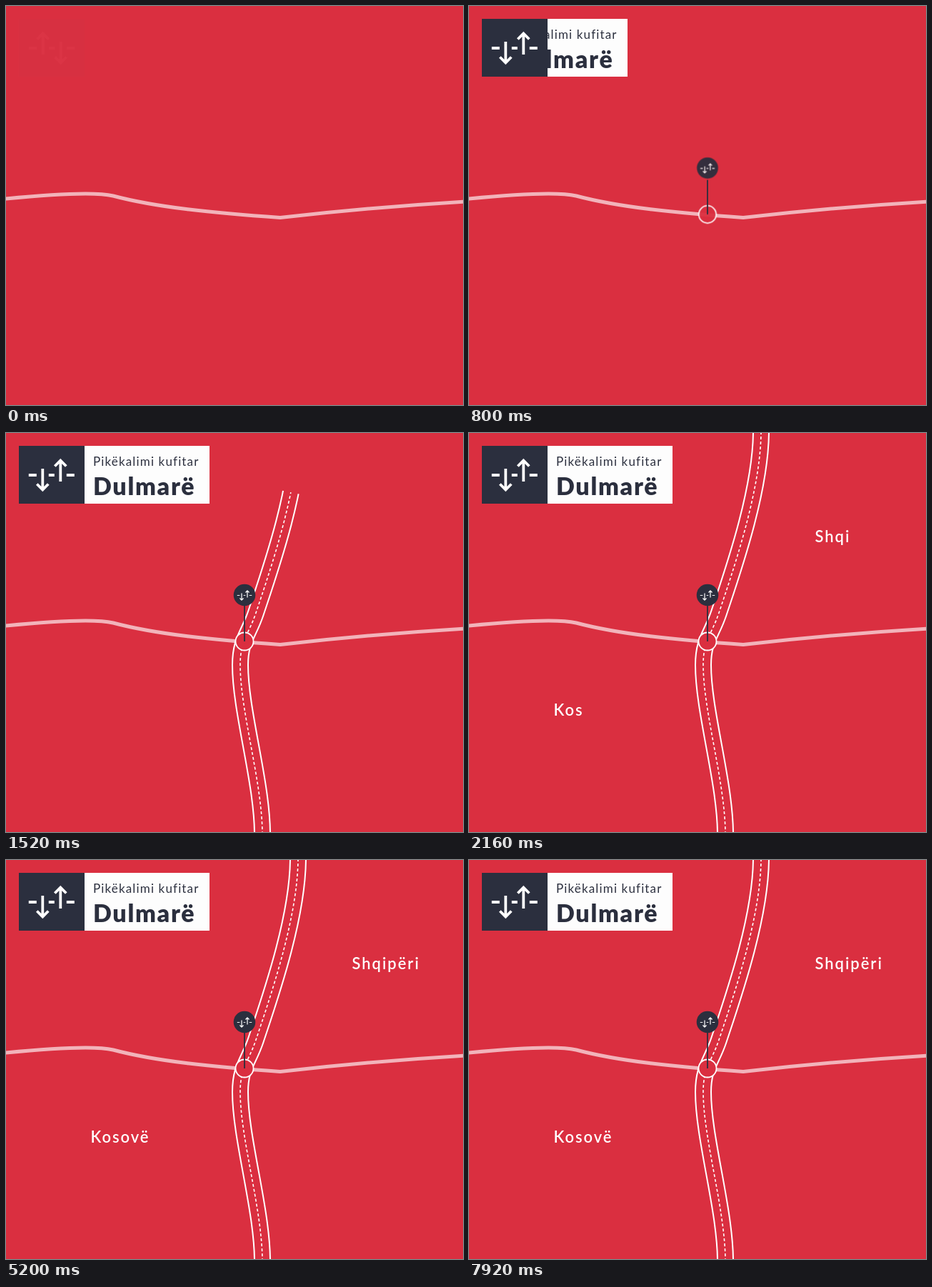
Animation, 640 px wide and 559 px high, one loop 8 s. Source, as an HTML page:

```html
<!DOCTYPE html>
<html lang="sq">
<head>
<meta charset="utf-8">
<title>Border crossing</title>
<style>
  html, body { margin: 0; height: 100%; overflow: hidden; background: #da2f40; }
  .stage { position: relative; width: 640px; height: 559px; overflow: hidden; }
  svg { position: absolute; left: 0; top: 0; overflow: visible; }
  text { font-family: Lato, "Open Sans", sans-serif; }
  .label { font-size: 22px; font-weight: 600; letter-spacing: 1.95px; fill: #fff; }
  .icon { fill: none; stroke: #fff; stroke-width: 3.8; }
  .card, .slot { position: absolute; top: 18px; height: 81px; }
  .card { left: 18px; width: 92px; background: #2b2f3e; }
  .slot { left: 109px; width: 176px; overflow: hidden; }
  .panel { position: absolute; width: 176px; height: 81px; background: #fdfdfd; }
  .panel text { fill: #2b2f3e; }
  .kind { font-size: 17px; letter-spacing: 1.15px; }
  .name { font-size: 34px; font-weight: 900; letter-spacing: 1.7px; }
  #head, #ring { transform-box: fill-box; transform-origin: center; }
  #pole { transform-origin: 334px 292px; }
</style>
</head>
<body>
<div class="stage">
  <svg width="640" height="559">
    <defs>
      <path id="route" d="M359 562 C359 490 328 390 328 325 C328 290 340 282 350 252 C370 192 409 80 409 -3"/>
      <path id="arrows" d="M-32 0h11M-4 0h8M21 0h11M-12.5 -9v29M-20.5 12.5l8 8l8 -8M12.5 9v-29M4.5 -12.5l8 -8l8 8"/>
      <mask id="reveal" maskUnits="userSpaceOnUse" x="0" y="-10" width="640" height="580">
        <use id="wipe" href="#route" fill="none" stroke="#fff" stroke-width="34"/>
      </mask>
    </defs>
    <path d="M-3 270.3 C60 264 125 260 150 266 C210 282 290 290 384 296.5 Q510 282 643 274"
          fill="none" stroke="#f2b3ba" stroke-width="5"/>
    <g mask="url(#reveal)" fill="none">
      <use href="#route" stroke="#fff" stroke-width="24"/>
      <use href="#route" stroke="#da2f40" stroke-width="20"/>
      <use href="#route" stroke="#fff" stroke-width="1.6" stroke-dasharray="4 3"/>
    </g>
    <circle id="ring" cx="334" cy="292" r="12.5" fill="#da2f40" stroke="#fff" stroke-width="1.8"/>
    <path id="pole" d="M334 292V241" stroke="#2b2f3e" stroke-width="1.8"/>
    <g id="head">
      <circle cx="334" cy="227" r="15.3" fill="#2b2f3e"/>
      <use href="#arrows" class="icon" transform="translate(334 227.5) scale(.32)"/>
    </g>
    <text class="label" x="484.5" y="152.5">Shqipëri</text>
    <text class="label" x="118.5" y="395.5">Kosovë</text>
  </svg>
  <div class="slot">
    <div class="panel">
      <svg width="176" height="81">
        <text class="kind" x="13" y="28">Pikëkalimi kufitar</text>
        <text class="name" x="13" y="69">Dulmarë</text>
      </svg>
    </div>
  </div>
  <div class="card">
    <svg width="92" height="81"><use href="#arrows" class="icon" transform="translate(45.8 41)"/></svg>
  </div>
</div>
<script>
  const LOOP = 8000;
  const IN_OUT = 'cubic-bezier(.455,.03,.515,.955)';
  const OUT = 'cubic-bezier(.25,.46,.45,.94)';
  const $ = selector => document.querySelector(selector);

  // Hold `from`, move during [start, end], then hold `to` until the loop restarts.
  function move(el, start, end, from, to, easing = 'linear') {
    el.animate([
      { ...from, offset: 0 },
      { ...from, offset: start / LOOP, easing },
      { ...to, offset: end / LOOP },
      { ...to, offset: 1 }
    ], { duration: LOOP, iterations: Infinity });
  }

  const turn = angle => ({ transform: `perspective(900px) rotateY(${angle}deg)` });
  move($('.card'), 0, 700, turn(-178), turn(0), IN_OUT);
  move($('.card'), 0, 450, { opacity: .025 }, { opacity: 1 });
  move($('.panel'), 400, 1100, { transform: 'translateX(-176px)' }, { transform: 'none' }, IN_OUT);

  for (const id of ['#head', '#ring'])
    move($(id), 490, 890, { transform: 'scale(.5)', opacity: 0 }, { transform: 'scale(1)', opacity: 1 }, OUT);
  move($('#pole'), 490, 890, { transform: 'scaleY(0)' }, { transform: 'scaleY(1)' }, OUT);

  const wipe = $('#wipe');
  const length = $('#route').getTotalLength();
  wipe.style.strokeDasharray = `${length} ${length + 20}`;
  move(wipe, 900, 1760, { strokeDashoffset: length + 1 }, { strokeDashoffset: 0 }, IN_OUT);

  // Both labels type over the same span, whatever their length.
  const TYPE_START = 1700, TYPE_TIME = 900;
  for (const label of document.querySelectorAll('.label')) {
    const letters = [...label.textContent];
    label.textContent = '';
    letters.forEach((letter, i) => {
      const span = document.createElementNS(label.namespaceURI, 'tspan');
      span.textContent = letter;
      label.append(span);
      const at = TYPE_START + TYPE_TIME * (i + 1) / letters.length;
      move(span, at - 1, at, { fillOpacity: 0 }, { fillOpacity: 1 });
    });
  }
</script>
</body>
</html>
```
